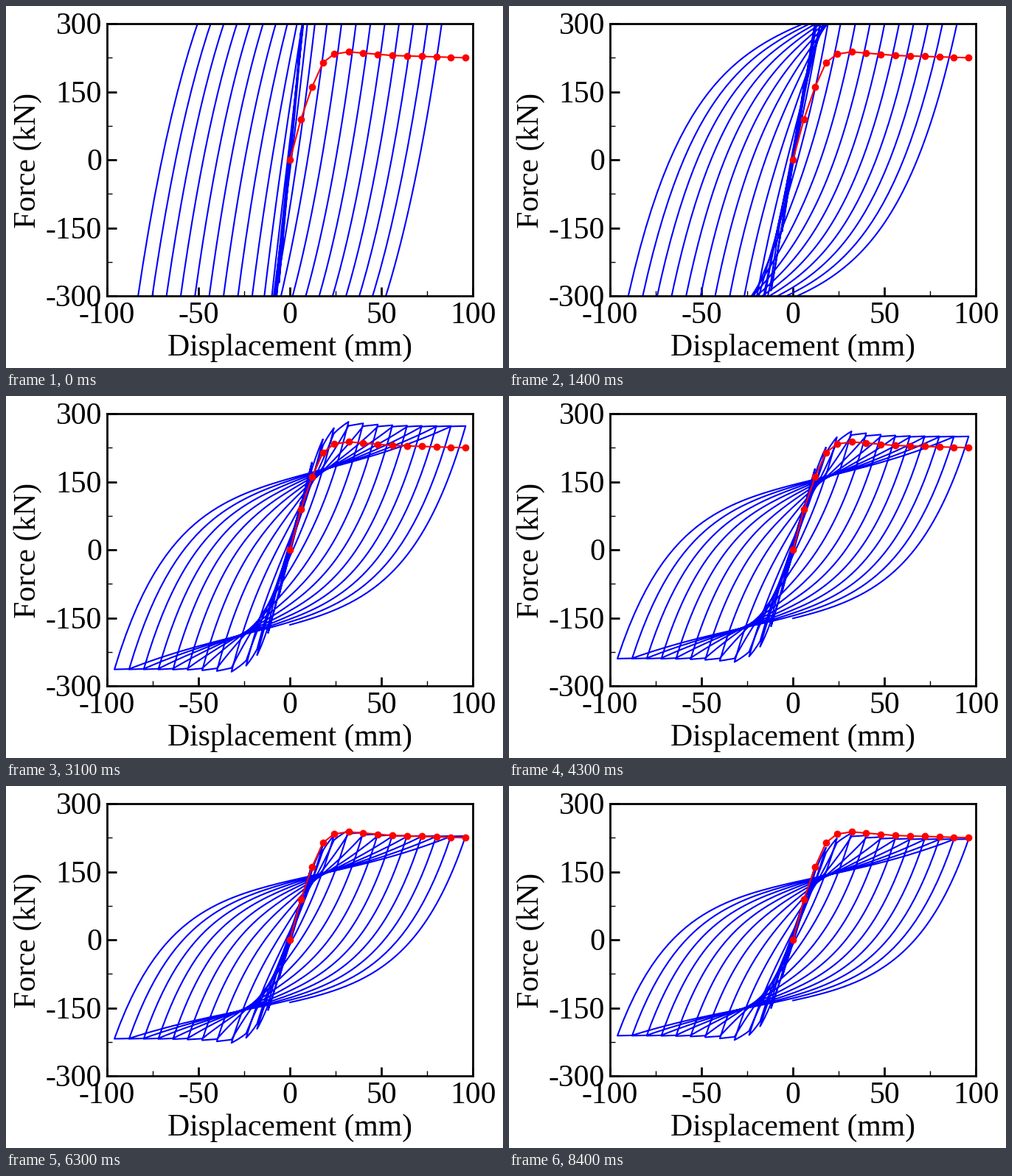
Animation, 674 px wide and 492 px high, one loop 8500 ms. Source, as a matplotlib script:

```python
import numpy as np
import matplotlib.pyplot as plt
from matplotlib.animation import FuncAnimation

W, H, DPI = 674, 492, 100
FRAMES, STEP = 85, 100
plt.rcParams["font.family"] = "Liberation Serif"
plt.rcParams["font.size"] = 30

AMPS = np.r_[0:24:6, 24:97:8]

# measured skeleton: (mm, kN)
TEST = np.array([(0, 0), (6, 90), (12, 160), (18, 214), (24, 233),
                 (32, 238), (56, 230), (96, 225)])
# peak force during calibration: (ms, kN)
FIT = np.array([(0, 755), (900, 735), (1400, 441), (1800, 418), (2400, 294),
                (4300, 261), (5400, 244), (8400, 235)])


class Model:
    """Cyclic model whose parameters all follow the current peak force."""

    def __init__(self, peak):
        over = peak - 235
        k = np.clip(over / 60, 0, 1)
        self.peak = peak
        self.neg = .938 + .018 * k
        self.soft = 1 - (.943 + .03 * k) / 1.042
        self.sat = (1.54 + .001 * over) * peak
        self.length = 31 + over / 60

    def backbone(self, a, sign):
        r = .0635 * a / 1.045
        rise = 1.045 * r / (1 + r**3)**(1 / 3)
        fade = 1 - np.exp(-np.maximum(a - 32, 0) / 14)
        force = self.peak * rise * (1 - self.soft * fade)
        return force if sign > 0 else force * self.neg * (1 + .014 * fade)

    def swing(self, amp, prev, sign, end=None):
        """Leave the opposite peak and aim just short of the previous one."""
        start = self.backbone(amp, -sign)
        goal = self.backbone(prev, sign) * (1 - dip(prev))
        span = amp + prev
        u = np.linspace(0, end or span, 60)
        scale = self.length * (.84 + .16 * np.clip((amp - 24) / 72, 0, 1))
        sat = self.sat * (self.neg if sign > 0 else 1)
        rest = goal + start - sat * (1 - np.exp(-span / scale))
        y = -start + sat * (1 - np.exp(-u / scale)) + rest * (u / span)**3
        return sign * (u - amp), sign * y

    def advance(self, prev, amp, sign):
        """Climb from the weakened previous peak to the new one."""
        s = np.linspace(0, 1, 8)
        a = prev + (amp - prev) * s
        y = self.backbone(a, sign) * (1 - dip(prev) * (1 - s))
        return sign * a, sign * y

    def loops(self):
        parts = []
        for prev, amp in zip(AMPS, AMPS[1:]):
            if prev:
                parts.append(self.swing(prev, prev, -1))
            parts.append(self.advance(prev, amp, -1))
            parts.append(self.swing(amp, prev, 1))
            parts.append(self.advance(prev, amp, 1))
        # the last unloading stops at zero displacement
        parts.append(self.swing(AMPS[-1], AMPS[-2], -1, end=AMPS[-1]))
        return np.hstack(parts)


def dip(a):
    return .12 * np.exp(-a / 24)


fig = plt.figure(figsize=(W / DPI, H / DPI), dpi=DPI, facecolor="white")
L, R, T, B = 137.1, 633.2, 24.1, 394.1
ax = fig.add_axes([L / W, 1 - B / H, (R - L) / W, (B - T) / H])
ax.set_xlim(-100, 100)
ax.set_ylim(-300, 300)
ax.set_xticks(range(-100, 101, 50))
ax.set_yticks(range(-300, 301, 150))
ax.set_xticks(range(-75, 100, 50), minor=True)
ax.set_yticks(range(-225, 300, 150), minor=True)
ax.tick_params(which="major", direction="in", length=9, width=2,
               labelbottom=False, labelleft=False)
ax.tick_params(which="minor", direction="in", length=5, width=1)
for spine in ax.spines.values():
    spine.set_linewidth(2)


def label(x, y, text, **kw):
    fig.text(x / W, 1 - y / H, text, va="baseline", **kw)


for v in range(-100, 101, 50):
    label(L + (v + 100) / 200 * (R - L), 431, str(v), ha="center")
for v in range(-300, 301, 150):
    label(130, T + (300 - v) / 600 * (B - T) + 14, str(v), ha="right")
label(384.7, 474.5, "Displacement (mm)", ha="center")
label(40, 209.5, "Force (kN)", ha="center", rotation=90,
      rotation_mode="anchor")

curve, = ax.plot([], [], color="#0000ff", lw=1.5, zorder=2)
ax.plot(AMPS, np.interp(AMPS, *TEST.T), "o-", color="#ff0000", lw=1.5, ms=6,
        zorder=2.2)


def update(i):
    peak = np.interp(i * STEP, *FIT.T)
    curve.set_data(*Model(peak).loops())
    return curve,


anim = FuncAnimation(fig, update, frames=FRAMES, interval=STEP,
                     repeat=True, repeat_delay=0)
plt.show()
```
